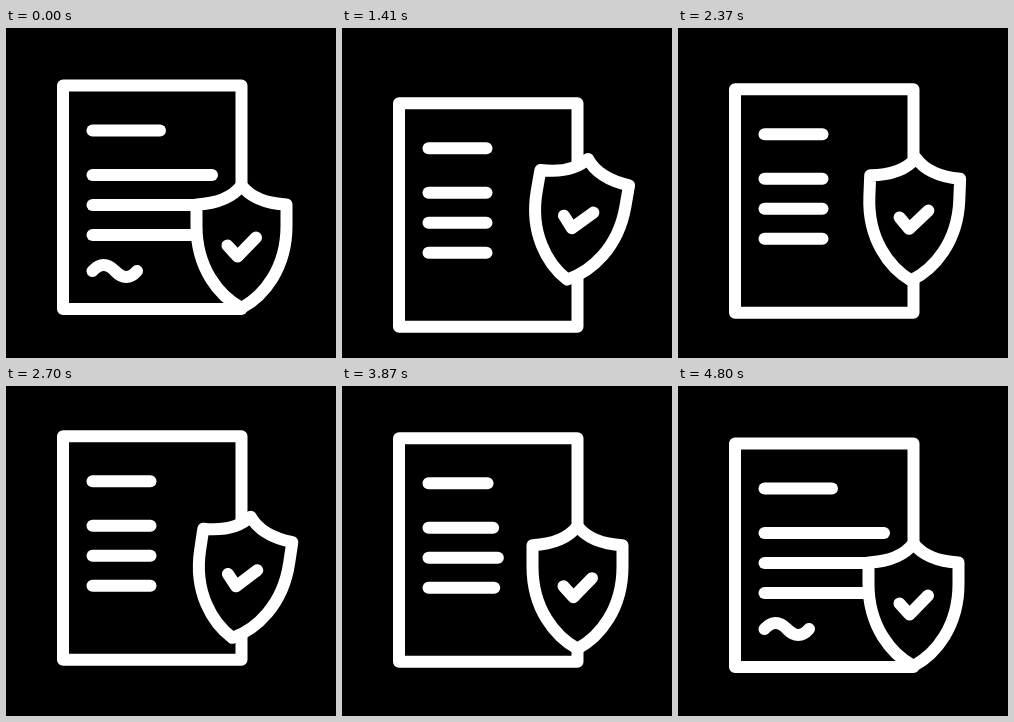
An HTML page with a canvas for the animation above (4830 ms loop, 330 by 330 pixels).

```html
<!DOCTYPE html>
<html lang="en">
<head>
<meta charset="utf-8">
<title>Protected document</title>
<style>
  html, body { margin: 0; width: 100%; height: 100%; overflow: hidden; background: #000; }
  canvas { display: block; width: 100vw; height: 100vh; }
</style>
</head>
<body>
<canvas width="330" height="330"></canvas>
<script>
const LOOP = 4830;
const LEFT = 86.5, SHORT_END = 144.5;
const CENTER_X = 235.5, CENTER_Y = 219;
const ctx = document.querySelector("canvas").getContext("2d");

const shield = new Path2D(`M235.500 157.500Q249 175 280.500 176.500V198C280.500 240 258 268 235.500 280
  C213 268 190.500 240 190.500 198V176.500Q222 175 235.500 157.500Z`);
const check = new Path2D("M221.500 217.500L231.500 228.500L250 209.500");
const signature = new Path2D("M86.500 243Q97.500 231 109 243T131 243");
const SIGNATURE_LENGTH = 53;

// Smooth progress from 0 to 1 between two times
function ease(t, from, to) {
  const f = Math.min(1, Math.max(0, (t - from) / (to - from)));
  return f * f * (3 - 2 * f);
}

function line(x1, y1, x2, y2) {
  ctx.beginPath();
  ctx.moveTo(x1, y1);
  ctx.lineTo(x2, y2);
  ctx.stroke();
}

function drawPage(t) {
  const y = 20 * ease(t, 320, 1700) - 33 * ease(t, 1700, 3060) + 13 * ease(t, 3060, 4500);
  const spread = 1 - ease(t, 320, 966) + ease(t, 3710, 4500);
  const textLine = (y, end) => line(LEFT, y, SHORT_END + (end - SHORT_END) * spread, y);

  ctx.save();
  ctx.translate(0, y);
  ctx.strokeRect(57, 57.5, 178.5, 223.5);
  textLine(102.5, 154);
  textLine(147, 206);
  textLine(177, 250);
  textLine(207, 216);

  const ink = 1 - ease(t, 320, 930) + ease(t, 3950, 4600);
  if (ink > 0.01) {
    ctx.setLineDash([ink * SIGNATURE_LENGTH, 2 * SIGNATURE_LENGTH]);
    ctx.stroke(signature);
  }
  ctx.restore();
}

// Three short rays on each side come out from behind the shield.
function drawRays(t) {
  const tip = 35 + 41 * ease(t, 3850, 4400);
  const tail = 35 + 41 * ease(t, 4200, 4800);
  if (tip - tail < 0.1) return;
  for (const side of [-1, 1]) {
    for (const tilt of [-1, 0, 1]) {
      const x = side * Math.cos(tilt), y = Math.sin(tilt);
      line(CENTER_X + x * tail, 212 + y * tail, CENTER_X + x * tip, 212 + y * tip);
    }
  }
}

function drawShield(t) {
  const lift = 27.5 * (ease(t, 320, 890) - ease(t, 3570, 4300));
  const turn = 10 * (ease(t, 870, 1460) - 2 * ease(t, 1460, 2060)
    + 2 * ease(t, 2060, 2600) - ease(t, 2600, 3020));

  ctx.save();
  ctx.translate(CENTER_X, CENTER_Y - lift);
  ctx.rotate(turn * Math.PI / 180);
  ctx.translate(-CENTER_X, -CENTER_Y);
  ctx.fill(shield);
  ctx.stroke(shield);
  ctx.stroke(check);
  ctx.restore();
}

function draw(t) {
  ctx.fillStyle = "#000";
  ctx.fillRect(0, 0, 330, 330);
  ctx.strokeStyle = "#fff";
  ctx.lineWidth = 12;
  ctx.lineCap = ctx.lineJoin = "round";
  drawPage(t);
  drawRays(t);
  drawShield(t);
}

const start = performance.now();
function tick() {
  draw((performance.now() - start) % LOOP);
  requestAnimationFrame(tick);
}
tick();
</script>
</body>
</html>
```
